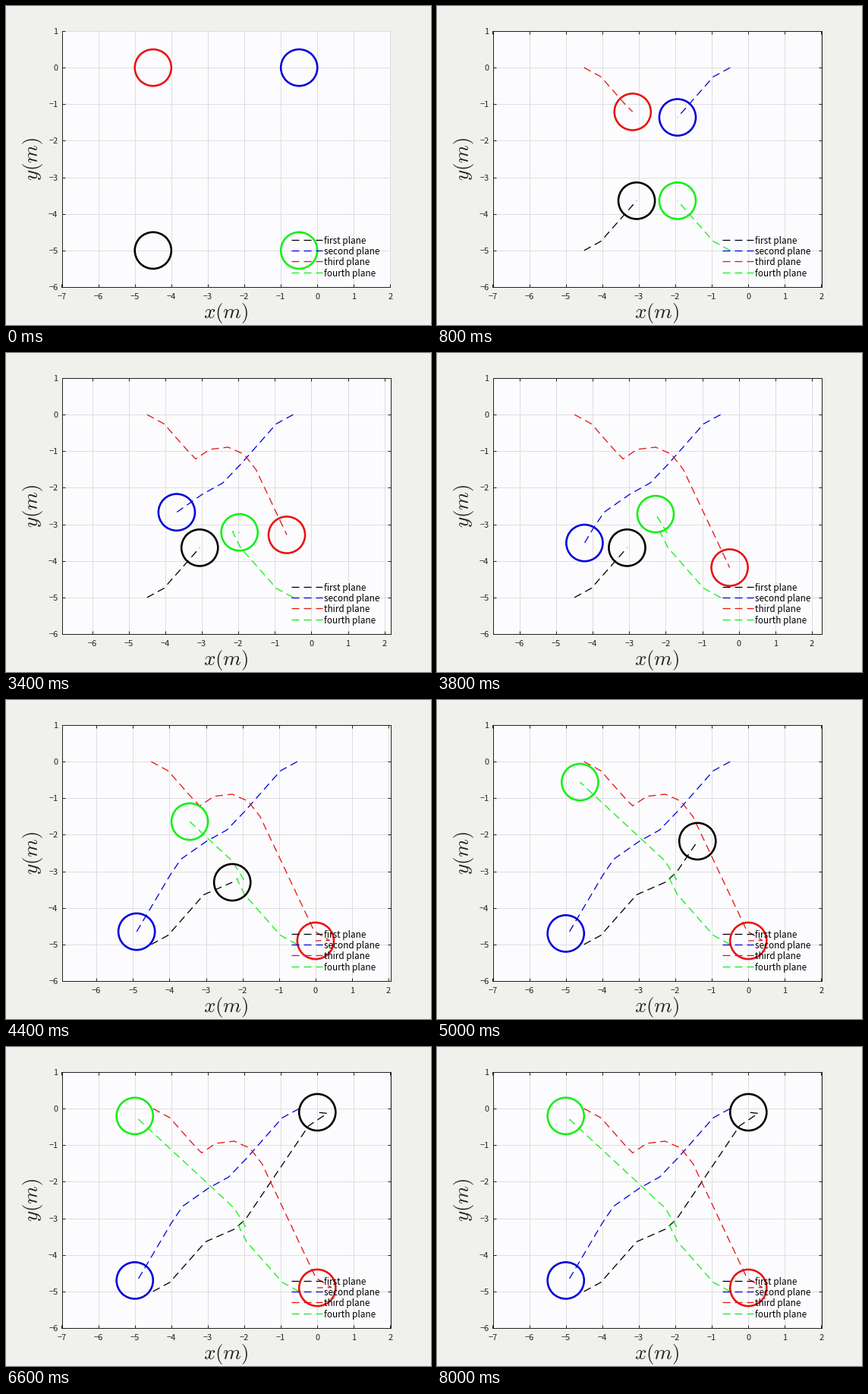
Animation, 560 px wide and 420 px high, one loop 8.2 s. Source, as a matplotlib script:

```python
import matplotlib.pyplot as plt
import numpy as np
from matplotlib.animation import FuncAnimation
from matplotlib.lines import Line2D
from matplotlib.patches import Circle
from matplotlib.ticker import MultipleLocator
from matplotlib.transforms import Affine2D

W, H, DPI = 560, 420, 100
STEPS, INTERVAL = 41, 200
PX = 72 / DPI
RADIUS, SPEED = 0.5, 0.5
CENTRE = np.array([-2.5, -2.5])
INK, PAPER, PANEL, GRID = "#222222", "#f0f0ec", "#fcfcff", "#dedee0"

plt.rcParams.update({
    "font.family": "Noto Sans CJK JP",
    "mathtext.fontset": "cm",
    "axes.edgecolor": INK,
    "axes.linewidth": PX,
    "text.color": INK,
})

# name, colour, corner, share of the approach, pause after it,
# then turns (x, y, optional pause) up to the goal
PLANES = [
    ("first plane", "#000000", (-1, -1), 1, 16,
     [(-2.28, -3.3), (-1.97, -3.03), (-0.24, -0.47), (0.27, -0.13), (0, -0.1)]),
    ("second plane", "#0404d8", (1, 1), 1, 7,
     [(-2.43, -1.87, 2), (-2.99, -2.18), (-3.69, -2.67), (-4, -3.13),
      (-4.9, -4.65), (-5, -4.7)]),
    ("third plane", "#e81410", (-1, 1), 0.66, 0,
     [(-3.17, -1.21, 5), (-2.78, -0.95), (-2.28, -0.89), (-1.85, -1.08),
      (-1.52, -1.5), (-0.04, -4.63), (0.38, -4.89), (0, -4.9)]),
    ("fourth plane", "#14f014", (1, -1), 1, 3,
     [(-2.16, -3.2, 4), (-1.97, -3.22, 5), (-2.28, -2.72), (-5, -0.2)]),
]


def route(corner, share, pause, turns):
    """Position at every step: whole steps per leg at about SPEED."""
    start, bend, meet = (CENTRE + np.multiply(corner, d)
                         for d in ((2, 2.5), (1.54, 2.25), (0.56, 1.14)))
    stops = [(*start,), (*bend,), (*(bend + share * (meet - bend)), pause)] + turns
    pos, path = start, [start]
    for x, y, *wait in stops[1:]:
        leg = np.array([x, y]) - pos
        n = max(1, round(np.hypot(*leg) / SPEED))
        path += [pos + leg * i / n for i in range(1, n + 1)]
        pos = np.array([x, y])
        path += [pos] * sum(wait)
    path += [pos] * STEPS
    return np.array(path[:STEPS])


fig = plt.figure(figsize=(W / DPI, H / DPI), dpi=DPI, facecolor=PAPER)
pixels = Affine2D().scale(1 / W, -1 / H).translate(0, 1) + fig.transFigure

left, right, top, bottom = 73.5, 506.5, 33, 370
ax = fig.add_axes([left / W, 1 - bottom / H, (right - left) / W, (bottom - top) / H],
                  facecolor=PANEL)
ax.set_ylim(-6, 1)
ax.set_axisbelow(True)
ax.grid(color=GRID, linewidth=PX)
for axis in (ax.xaxis, ax.yaxis):
    axis.set_major_locator(MultipleLocator(1))
    axis.set_major_formatter("{x:.0f}")
ax.tick_params(direction="in", length=4 * PX, width=PX, color=INK,
               labelcolor=INK, labelsize=11 * PX)
ax.tick_params(axis="x", pad=8 * PX)
ax.tick_params(axis="y", pad=5 * PX)

label = dict(transform=pixels, fontsize=27 * PX, ha="center", va="baseline")
fig.text(290, 411, "$x(m)$", **label)
fig.text(42, 201, "$y(m)$", rotation=90, rotation_mode="anchor", **label)

routes, rings, trails = [], [], []
for i, (name, color, *plan) in enumerate(PLANES):
    dashed = dict(color=color, lw=1.3 * PX, ls=(0, (10 / 1.3, 6 / 1.3)),
                  dash_capstyle="butt")
    dashed["ls"] = (0, (10, 6)) if not plt.rcParams["lines.scale_dashes"] else \
        (0, (10 / (1.3 * PX) * PX, 6 / (1.3 * PX) * PX))
    routes.append(route(*plan))
    trails += ax.plot([], [], zorder=3, **dashed)
    rings.append(ax.add_patch(Circle((0, 0), RADIUS, fill=False, ec=color,
                                     lw=2.6 * PX, zorder=4)))
    y = 307.5 + 14.4 * i
    fig.add_artist(Line2D([376, 416.5], [y, y], transform=pixels, **dashed))
    fig.text(419, y, name, transform=pixels, fontsize=11.7 * PX,
             color="#000000", va="center_baseline")


def draw(k):
    for path, ring, trail in zip(routes, rings, trails):
        trail.set_data(*path[:k + 1].T)
        ring.center = tuple(path[k])

    # the view stays centred on everything drawn
    xs = np.concatenate([np.r_[p[:k + 1, 0], p[k, 0] - RADIUS, p[k, 0] + RADIUS]
                         for p in routes])
    mid = (xs.min() + xs.max()) / 2
    ax.set_xlim(mid - 4.5, mid + 4.5)

    # the frame closes once the planes are moving
    ax.tick_params(top=k > 0, right=k > 0)
    ax.spines[["top", "right"]].set_visible(k > 0)
    return rings + trails


anim = FuncAnimation(fig, draw, frames=STEPS, interval=INTERVAL,
                     repeat=True, repeat_delay=0, blit=False)
plt.show()
```
